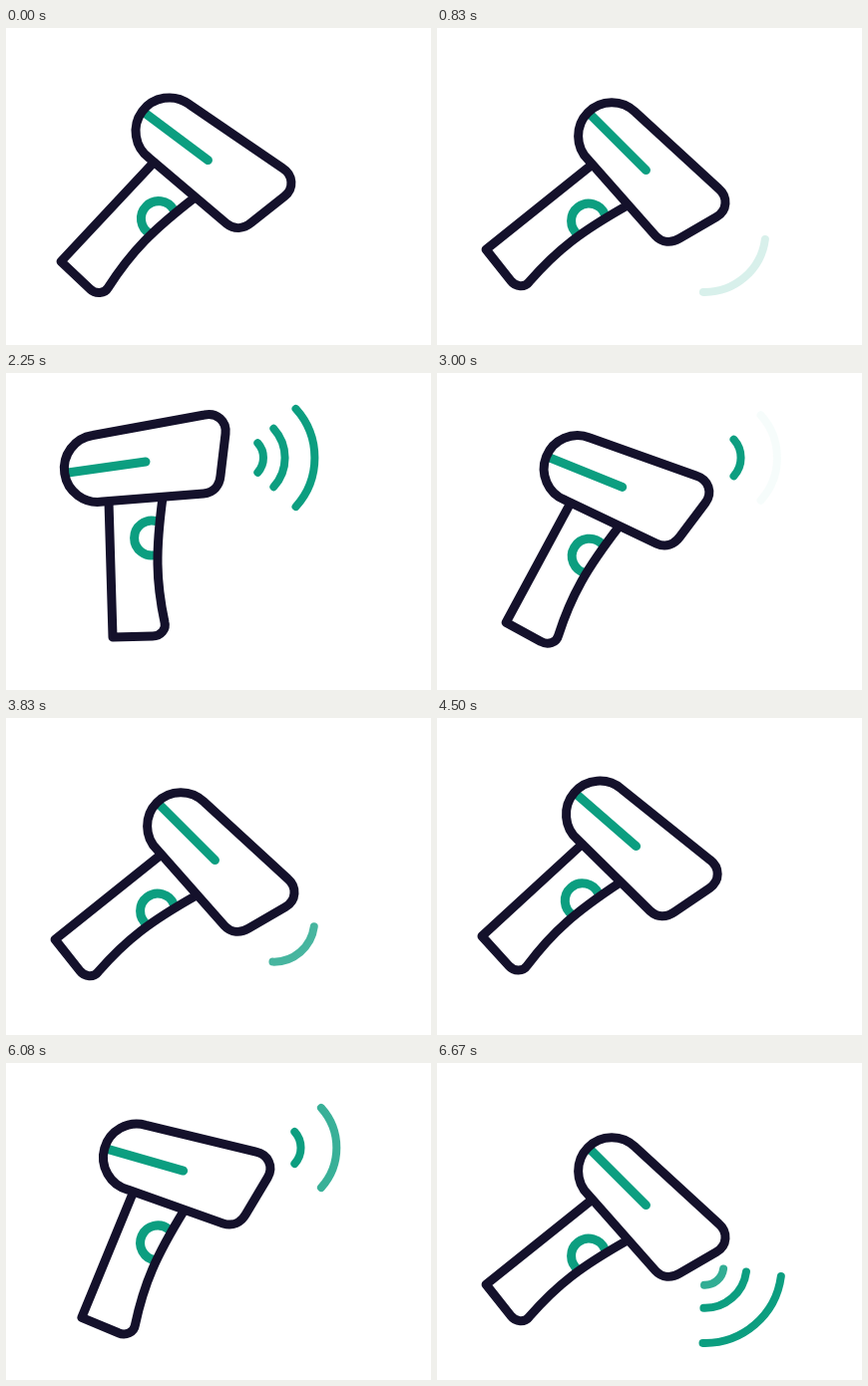
Recreate the animation shown at these times as an HTML page. Size 426 by 318 pixels, loop 6.76 s.

```html
<!DOCTYPE html>
<html lang="en">
<head>
<meta charset="utf-8">
<title>Scanner</title>
<style>
html, body { margin: 0; width: 100%; height: 100%; overflow: hidden; background: #fff; }
svg { display: block; width: 100vw; height: 100vh; fill: none; stroke-linecap: round; stroke-linejoin: round; }
.ink { stroke: #14112b; stroke-width: 9; }
.teal { stroke: #0c9e80; stroke-width: 9; }
#waves { stroke: #0c9e80; stroke-width: 8; }
</style>
</head>
<body>
<svg viewBox="0 0 426 318">
  <g id="waves"></g>
  <g id="gun">
    <path class="teal" stroke-linecap="butt" d="M151 148.7A17.5 17.5 0 1 0 151 182.3"/>
    <path class="ink" d="M103 129L107 265L147 264C155 264 161 257 159 250C150 208 150 178 157 125"/>
    <path class="teal" d="M62 100L140 89"/>
    <path class="ink" d="M97 129A33.5 33.5 0 0 1 87 62.5L199 42C211 39.5 221.5 48 220 61L215 103C214 113 208 120 198 121Z"/>
  </g>
</svg>
<script>
const LOOP = 6760, CYCLE = 3125;
const LIFE = 378, FADE = 58, SPREAD = 42 * Math.PI / 180;
const gun = document.getElementById('gun');
const waves = document.getElementById('waves');

const clamp = v => Math.max(0, Math.min(1, v));
const part = (a, b, t) => clamp((t - a) / (b - a));
const ease = (a, b, t) => (1 - Math.cos(Math.PI * part(a, b, t))) / 2;
const hump = u => Math.sin(Math.PI * u);

// A burst is three waves: the inner one starts at `start`, each outer one `lag` earlier.
const burst = (start, lag = 60) => [0, 1, 2].map(ring => ({
  ring,
  born: start - lag * ring,
  path: waves.appendChild(document.createElementNS('http://www.w3.org/2000/svg', 'path'))
}));

const low = {
  angle: 49.5 * Math.PI / 180, y: 204, x: () => 268.5, reach: 27,
  waves: [burst(372), burst(942)].flat()
};
const high = {
  angle: 0, y: 85, x: p => 236 + 44 * ease(2700, 3060, p), reach: 20,
  waves: [burst(1785), burst(2160), burst(2839, 214)].flat()
};

function drawWaves({ angle, y, x, reach, waves }, p) {
  const cx = x(p);
  for (const { ring, born, path } of waves) {
    const age = p - born, from = 15 * 2 ** ring, to = 44 + reach * ring;
    const r = from + (to - from) * clamp(age / LIFE);
    const at = a => `${cx + r * Math.cos(a)} ${y + r * Math.sin(a)}`;
    path.setAttribute('d', `M${at(angle - SPREAD)}A${r} ${r} 0 0 1 ${at(angle + SPREAD)}`);
    path.setAttribute('opacity', clamp(Math.min(age, LIFE - age) / FADE));
  }
}

function drawGun(p) {
  // The downward swing runs across the end of the cycle.
  const q = p < 1000 ? p + CYCLE : p;
  const raised = ease(1265, 1900, q) - ease(2662, 3287, q);
  const tilt = 53 * (1 - raised) - 3 * hump(part(1500, 2250, q));
  const pull = 10 * hump(1 - (1 - part(1250, 2250, q)) ** 2);
  const dip = 3 * hump(part(2662, 3287, q));
  gun.setAttribute('transform',
    `translate(${-pull} ${dip - 1.2 * pull}) rotate(${tilt} 121 185.5)`);
}

function draw(time) {
  const p = time % LOOP % CYCLE;
  drawGun(p);
  drawWaves(low, p);
  drawWaves(high, p);
}

const begin = performance.now();
function tick() {
  draw(performance.now() - begin);
  requestAnimationFrame(tick);
}
tick();
</script>
</body>
</html>
```
